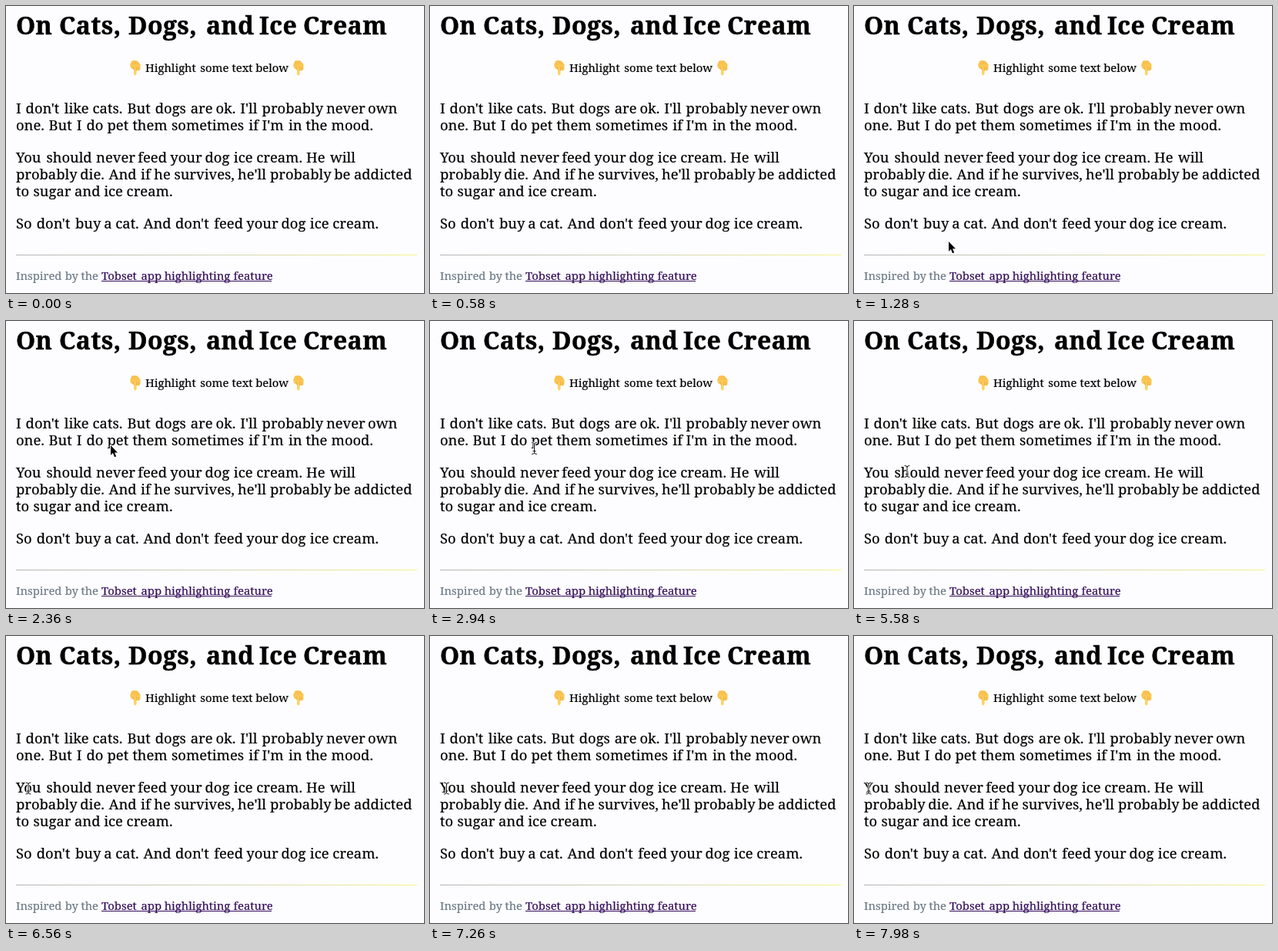
An HTML page that plays this animation: 543x374 px, repeating every 8000 ms.

```html
<!DOCTYPE html>
<html lang="en">
<head>
<meta charset="utf-8">
<title>On Cats, Dogs, and Ice Cream</title>
<style>
  html, body { margin: 0; width: 100%; height: 100%; overflow: hidden; background: #fdfdff; }
  svg { display: block; width: 543px; height: 374px; }
  text { font-family: "Noto Serif", serif; fill: #000; stroke: #000; stroke-width: .2px; white-space: pre; }
  .title { font-size: 32px; font-weight: 700; letter-spacing: .4px; stroke-width: .5px; }
  .body { font-size: 18.4px; }
  .small { font-size: 14.8px; }
  .muted { fill: #6c7a86; stroke: #6c7a86; }
  .link { fill: #330c58; stroke: #330c58; }
</style>
</head>
<body>
<svg id="stage" viewBox="0 0 543 374" xmlns="http://www.w3.org/2000/svg">
  <defs>
    <linearGradient id="rule">
      <stop offset="0" stop-color="#b4b4b4"/>
      <stop offset="0.5" stop-color="#d2d2b8"/>
      <stop offset="1" stop-color="#f4f48c"/>
    </linearGradient>
    <linearGradient id="skin" x1="0" y1="0" x2="0" y2="1">
      <stop offset="0" stop-color="#f9bd4a"/>
      <stop offset="1" stop-color="#ffd866"/>
    </linearGradient>
    <g id="hand">
      <path fill="url(#skin)" d="M3.5 .5Q7 -.5 10.5 .5L14.5 5V11Q14 13.4 12.2 12.8Q11 14 9.6 12.8V17.8Q9.4 19.6 7.8 19.6Q6.2 19.6 6 17.8V12L2.8 10.4Q.8 8 1.2 5.5Z"/>
      <path fill="none" stroke="#dc9a3a" stroke-width=".6" stroke-linecap="round" d="M6 12L4.8 8.4M9.6 12.6V8.4M12.2 12.6V8.6"/>
    </g>
  </defs>
  <rect x="13" y="324" width="521" height="1" fill="url(#rule)"/>
  <use href="#hand" x="160" y="71"/>
  <use href="#hand" x="372" y="71"/>
  <g id="copy"></g>
  <rect x="124" y="358" width="221" height="1" fill="#330c58"/>
  <g id="arrow" stroke-linejoin="round">
    <path d="M0 0V12.8L2.9 10.1L5 15.3L7.2 14.4L5.1 9.4H9Z" fill="#000" stroke="#fff" stroke-width="2.2" paint-order="stroke"/>
  </g>
  <g id="beam" fill="none" stroke-linecap="round"></g>
</svg>
<script>
const LOOP = 8000;
const NS = "http://www.w3.org/2000/svg";
const byId = id => document.getElementById(id);

function add(parent, name, attrs) {
  const node = document.createElementNS(NS, name);
  for (const key in attrs) node.setAttribute(key, attrs[key]);
  parent.append(node);
  return node;
}

// Advances of the page's text face, in 1/1000 em; they set where words begin.
const adv = {
  a: 504, b: 560, c: 454, d: 574, e: 484, f: 325, g: 509, h: 582, i: 293,
  k: 535, l: 287, m: 880, n: 591, o: 539, p: 571, r: 410, s: 432, t: 346,
  u: 576, v: 497, w: 738, x: 502, y: 493, A: 671, B: 654, H: 815, I: 390,
  S: 561, T: 618, Y: 615, "'": 215, ".": 270, ",": 270, " ": 241
};

function wordStarts(text, x, em) {
  return text.split(" ").map(word => {
    const start = x;
    for (const ch of word + " ") x += adv[ch] * em / 1000;
    return start;
  });
}

function addLine(cls, text, y, starts) {
  const line = add(byId("copy"), "text", { class: cls, y });
  text.split(" ").forEach((word, i, all) => {
    const span = add(line, "tspan", { x: starts[i].toFixed(2) });
    span.textContent = i < all.length - 1 ? word + " " : word;
  });
}

function write(cls, text, x, y, em) {
  addLine(cls, text, y, wordStarts(text, x, em));
}

addLine("title", "On Cats, Dogs, and Ice Cream", 37, [13, 69, 159, 260, 329, 386]);
write("small", "Highlight some text below", 181, 86, 16);
[
  [140, "I don't like cats. But dogs are ok. I'll probably never own"],
  [162, "one. But I do pet them sometimes if I'm in the mood."],
  [204, "You should never feed your dog ice cream. He will"],
  [226, "probably die. And if he survives, he'll probably be addicted"],
  [248, "to sugar and ice cream."],
  [290, "So don't buy a cat. And don't feed your dog ice cream."]
].forEach(([y, text]) => write("body", text, 13, y, 20));
write("small muted", "Inspired by the", 13, 357, 16);
write("small link", "Tobset app highlighting feature", 124, 357, 16);

// Pointer path: time, x, y of the hot spot.
const SHOW = 600, SWITCH = 2500;
const path = [
  [600, 118, 351], [840, 121, 328], [1280, 123, 307], [1560, 124, 298],
  [1660, 124, 292], [2000, 130, 225], [2360, 136, 162], [2500, 136, 162],
  [2940, 135.5, 166], [4340, 135.5, 166], [4800, 110, 179], [5160, 82, 192],
  [5580, 69, 196], [5900, 50, 197.5], [6560, 29, 198.5], [7000, 23, 198.5],
  [7580, 19.5, 198.5], [8000, 19, 198.5]
];

function pointAt(t) {
  let i = 1;
  while (i < path.length - 1 && path[i][0] < t) i++;
  const [t0, x0, y0] = path[i - 1], [t1, x1, y1] = path[i];
  const k = Math.min(1, Math.max(0, (t - t0) / (t1 - t0)));
  return [x0 + (x1 - x0) * k, y0 + (y1 - y0) * k];
}

const arrow = byId("arrow"), beam = byId("beam");
const beamShape = "M-3 -7.5Q0 -7.5 0 -5.5Q0 -7.5 3 -7.5M0 -5.5V5.5M-3 7.5Q0 7.5 0 5.5Q0 7.5 3 7.5M-1.5 3.5H1.5";
add(beam, "path", { d: beamShape, stroke: "#fff", "stroke-width": 2.6 });
add(beam, "path", { d: beamShape, stroke: "#111", "stroke-width": 1 });

function place(node, visible, x, y) {
  node.setAttribute("visibility", visible ? "visible" : "hidden");
  node.setAttribute("transform", `translate(${x.toFixed(2)} ${y.toFixed(2)})`);
}

function draw(t) {
  const [x, y] = pointAt(t);
  place(arrow, t >= SHOW && t < SWITCH, x, y);
  place(beam, t >= SWITCH, x, y);
}

const begin = performance.now();
function tick() {
  draw((performance.now() - begin) % LOOP);
  requestAnimationFrame(tick);
}
tick();
</script>
</body>
</html>
```
